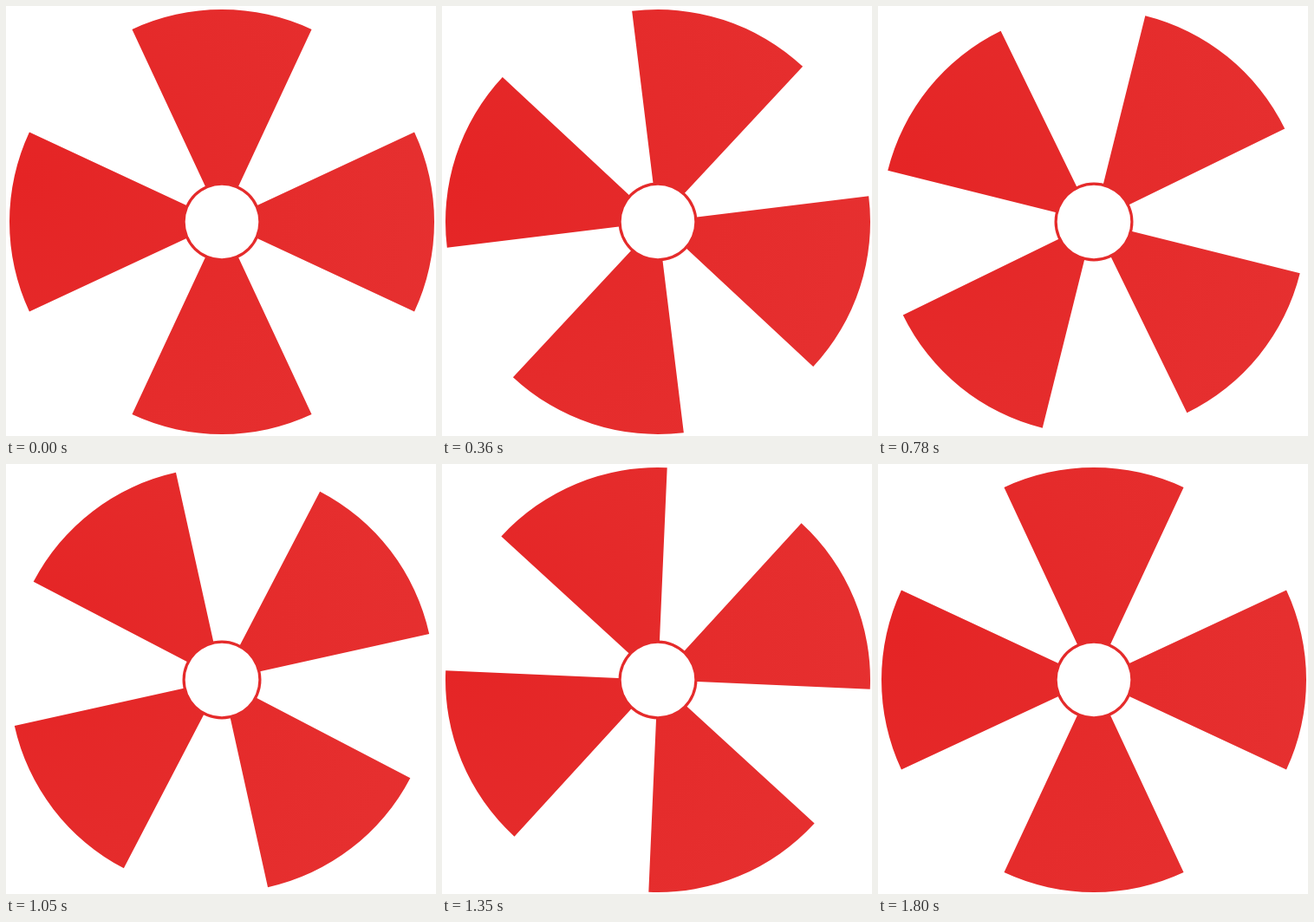
An HTML page with a canvas for the animation above (1.83 s loop, 496 by 496 pixels).

```html
<!DOCTYPE html>
<html lang="en">
<head>
<meta charset="utf-8">
<title>Spinning fan</title>
<style>
  html, body { margin: 0; width: 100%; height: 100%; overflow: hidden; background: #fff; }
  canvas { display: block; }
</style>
</head>
<body>
<canvas id="stage" width="496" height="496"></canvas>
<script>
  const LOOP = 1830, STEP = 30, STEP_DEG = 1.5;
  const CENTER = 249, RADIUS = 245, RING = 45.5, HUB = 42.3;
  const HALF_BLADE = 25;
  const TAU = Math.PI * 2;
  const rad = deg => deg * Math.PI / 180;

  const ctx = document.getElementById('stage').getContext('2d');

  // The shading stays still while the blades turn through it.
  const red = ctx.createRadialGradient(20, 200, 0, 20, 200, 500);
  red.addColorStop(0, '#e52425');
  red.addColorStop(0.5, '#e52b2b');
  red.addColorStop(1, '#e63030');

  function disc(radius, fill) {
    ctx.beginPath();
    ctx.arc(CENTER, CENTER, radius, 0, TAU);
    ctx.fillStyle = fill;
    ctx.fill();
  }

  function draw(time) {
    const turn = Math.floor((time % LOOP) / STEP) * STEP_DEG;
    ctx.clearRect(0, 0, 496, 496);
    ctx.beginPath();
    for (let blade = 0; blade < 4; blade++) {
      const mid = turn + blade * 90;
      ctx.moveTo(CENTER, CENTER);
      ctx.arc(CENTER, CENTER, RADIUS, rad(mid - HALF_BLADE), rad(mid + HALF_BLADE));
      ctx.closePath();
    }
    ctx.fillStyle = red;
    ctx.fill();
    disc(RING, red);
    disc(HUB, '#fff');
  }

  function tick() {
    draw(performance.now());
    requestAnimationFrame(tick);
  }

  draw(0);
  requestAnimationFrame(tick);
</script>
</body>
</html>
```
